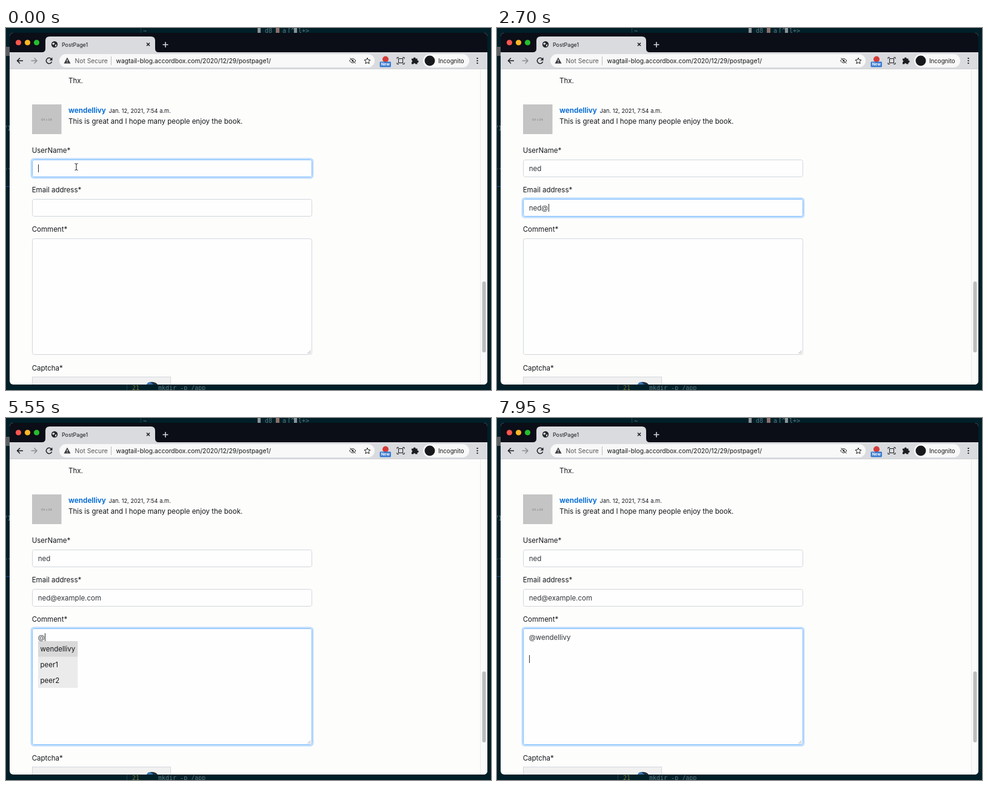
These frames come from a looping animation (800x597 px, 8000 ms). An HTML page:

```html
<!DOCTYPE html>
<html lang="en">
<head>
<meta charset="utf-8">
<title>Comment form</title>
<style>
  html, body { margin: 0; width: 100%; height: 100%; overflow: hidden; background: #001f28; }
  svg { display: block; width: 800px; height: 597px; }
  text { font: 11.5px Inter, "Open Sans", sans-serif; fill: #14171a; white-space: pre; }
  .typed { fill: #30353a; }
  .bold { font-weight: 700; }
  .mono { font: 10px "DejaVu Sans Mono", monospace; fill: #5b7a80; }
  .url { font-size: 10.28px; }
  .field { fill: #fefefe; stroke: #d2d7dc; }
  .focus { stroke: #80bdff; }
  .ring { fill: none; stroke: #007bff; stroke-opacity: .25; stroke-width: 2.4; }
  .icon { fill: none; stroke: #1c1d20; stroke-width: 1.5; }
  .thin { stroke-width: 1; }
</style>
</head>
<body>
<svg viewBox="0 0 800 597">
  <defs>
    <clipPath id="windowClip"><rect x="6" y="8" width="788" height="580" rx="6"/></clipPath>
  </defs>

  <!-- desktop behind the window -->
  <rect width="800" height="597" fill="#001f28"/>
  <path d="M222.500 0V8M199.500 588V597" stroke="#1b434c"/>
  <path d="M0 261.500H6" stroke="#1d4d8c"/>
  <rect y="31" width="6" height="15" fill="#5a6064"/>
  <rect x="415" width="5" height="8" fill="#8a9296"/>
  <rect x="445" width="6" height="8" fill="#8c6f68"/>
  <rect x="475" width="5" height="8" fill="#8a9296"/>
  <g>
    <text class="mono" x="226" y="9">~</text>
    <text class="mono" x="427" y="8">d8</text>
    <text class="mono" x="456" y="8">a</text>
    <text class="mono" x="464" y="8">[^</text>
    <text class="mono" x="482" y="8">l+&gt;</text>
    <text class="mono" x="-4" y="169">71</text>
    <text class="mono" x="-4" y="233">1.</text>
    <text class="mono" x="208" y="597" style="fill:#737a30">21</text>
    <text class="mono" x="251" y="597">mkdir -p /app</text>
  </g>

  <g clip-path="url(#windowClip)">
    <rect x="6" y="8" width="788" height="580" fill="#fdfdfc"/>
    <rect x="6" y="8" width="788" height="32" fill="#0b0d17"/>
    <path d="M59 40q6 0 6-6V21q0-7 7-7H239q7 0 7 7V34q0 6 6 6z" fill="#d9dbdf"/>
    <rect x="6" y="40" width="788" height="28" fill="#d9dbdf"/>
    <path d="M6 67.500H794" stroke="#cdcfd3"/>
    <circle cx="20.500" cy="24" r="4.600" fill="#fb564c"/>
    <circle cx="35.500" cy="24" r="4.600" fill="#fdb724"/>
    <circle cx="50.500" cy="24" r="4.600" fill="#25bd2d"/>

    <!-- tab -->
    <circle cx="80" cy="27" r="5.200" fill="#25262a"/>
    <path d="M76 25.500l3-1.500 1.500 1.500-1.500 2h-2zM81 27.500l2.500-.5-.5 2.500-2 1.500z" fill="#d9dbdf"/>
    <text x="92" y="30.500" style="font-size:8.9px">PostPage1</text>
    <path class="icon" d="M232 24.500l5 5m0-5l-5 5"/>
    <path class="icon" d="M258.500 27.500h9m-4.500-4.500v9" style="stroke:#d9dbdf"/>

    <!-- toolbar -->
    <path class="icon" d="M28 54H18.500m4.500-4.500L18.500 54l4.500 4.500"/>
    <path class="icon" d="M41.500 54H51m-4.500-4.500L51 54l-4.500 4.500" style="stroke:#8c8e92"/>
    <path class="icon" d="M74.600 51A4.700 4.700 0 1 0 75.500 55.500"/>
    <path d="M76.500 48.500v5h-5z" fill="#1c1d20"/>
    <rect x="88" y="43" width="520" height="22" rx="11" fill="#f8f8f8"/>
    <path d="M101 48.500l5.500 10h-11z" fill="#3a3b3f"/>
    <path d="M101 52v3m0 1v1.300" stroke="#f8f8f8" stroke-width="1.200"/>
    <text class="url" x="113.500" y="57.500" style="fill:#55575c">Not Secure</text>
    <path d="M173.500 47V61" stroke="#b9bbbf"/>
    <text class="url" x="181.500" y="57.500">wagtail-blog.accordbox.com/2020/12/29/postpage1/</text>
    <path class="icon thin" d="M566.500 54q5.200-7 10.500 0q-5.300 7-10.500 0zM567.500 49.500l9 9"/>
    <circle cx="571.800" cy="54" r="1.500" fill="#1c1d20"/>
    <path class="icon thin" d="M596 49.200l1.400 3.300 3.600.3-2.700 2.400.8 3.500-3.100-1.900-3.100 1.900.8-3.500-2.700-2.400 3.600-.3z"/>
    <circle cx="626" cy="51.500" r="5" fill="#d43c38"/>
    <rect x="616.500" y="55.500" width="18.500" height="9" rx="1.500" fill="#397bd0"/>
    <text class="bold" x="625.800" y="62.400" text-anchor="middle" style="font-size:6.5px;fill:#fff">New</text>
    <rect class="icon thin" x="647.500" y="50.500" width="7" height="7"/>
    <path class="icon thin" d="M645 51v-2.500h3m6 0h3V51m0 6v2.500h-3m-6 0h-3V57"/>
    <path d="M669 50.500h3.200a1.700 1.700 0 1 1 3.300 0h3v3.200a1.700 1.700 0 1 1 0 3.300v2.500h-3.200a1.600 1.600 0 0 0-3.200 0H669v-3a1.700 1.700 0 0 0 0-3.300z" fill="#1c1d20"/>
    <rect x="688" y="43" width="76" height="22" rx="11" fill="#f8f8f8"/>
    <circle cx="699" cy="54" r="8.500" fill="#18191c"/>
    <text x="713" y="57.500" style="font-size:9.7px">Incognito</text>
    <path d="M777.500 49v2m0 2v2m0 2v2" stroke="#1c1d20" stroke-width="2"/>

    <!-- page -->
    <rect x="782" y="68" width="12" height="520" fill="#fafafa"/>
    <path d="M782.500 68V588" stroke="#ebebeb"/>
    <rect x="785.500" y="418" width="6" height="117" rx="3" fill="#bdbdbd"/>
    <text x="103" y="91">Thx.</text>
    <rect x="43" y="126" width="48.500" height="49" fill="#c4c4c4"/>
    <text x="67" y="153" text-anchor="middle" style="font-size:5px;fill:#858585">64 x 64</text>
    <text class="bold" x="103" y="140" style="font-size:11.7px;fill:#0f72d6">wendellivy</text>
    <text x="169.500" y="140" style="font-size:9.25px">Jan. 12, 2021, 7:54 a.m.</text>
    <text x="103" y="158">This is great and I hope many people enjoy the book.</text>
    <text x="42.700" y="206">UserName*</text>
    <text x="42.700" y="271">Email address*</text>
    <text x="42.700" y="336">Comment*</text>
    <text x="42.700" y="564.500">Captcha*</text>
    <rect x="43.500" y="575.500" width="228" height="40" fill="#f1f1f1" stroke="#d2d7dc"/>
    <path d="M232 588q2-5 8-4l4 4z" fill="#3c78b8"/>
    <path d="M238 584q8-1 12 4h-7z" fill="#22303c"/>

    <rect class="field" x="43.500" y="217.500" width="461" height="28" rx="3"/>
    <rect class="field" x="43.500" y="282.500" width="461" height="28" rx="3"/>
    <rect class="field" x="43.500" y="347.500" width="461" height="191" rx="3"/>
    <rect id="ring" class="ring" x="41.800" width="464.400" rx="4"/>
    <path d="M497.500 537l5-5m-2 5l2-2" stroke="#8b8b8b" stroke-width=".8"/>

    <text class="typed" x="52.700" y="235.500"></text>
    <text class="typed" x="52.700" y="300.500"></text>
    <text class="typed" x="52.700" y="365.500"></text>

    <g id="menu">
      <rect id="menuBack" x="53" y="368" fill="#ebebeb"/>
      <rect id="menuTop" x="53" y="368" height="25.700" fill="#d9d9d9"/>
      <text x="56.500" y="385"><tspan id="match" class="bold"></tspan><tspan id="rest"></tspan></text>
      <g id="others">
        <text x="56.500" y="411">peer1</text>
        <text x="56.500" y="436.700">peer2</text>
      </g>
    </g>
    <rect id="caret" width="1" height="13" fill="#2b2f33"/>
    <path id="pointer" class="icon thin" d="M113.500 223.500q2.500 0 2.500 1.500q0-1.500 2.500-1.500M116 225v8M113.500 234.500q2.500 0 2.500-1.500q0 1.500 2.500 1.500"/>
  </g>
</svg>
<script>
const LOOP = 8000;
const MEMBER = 'wendellivy';
const byId = id => document.getElementById(id);
const attrs = (node, values) => {
  for (const key in values) node.setAttribute(key, values[key]);
};
const show = (node, on) => { node.style.display = on ? '' : 'none'; };

const fields = [...document.querySelectorAll('.field')];
const texts = [...document.querySelectorAll('.typed')];

// Keystroke times per field, after the time it gains focus.
const typing = [
  { focus: 0, text: 'ned', keys: [600, 750, 900] },
  { focus: 1450, text: 'ned@example.com',
    keys: [2150, 2300, 2400, 2600, 3000, 3250, 3450, 3650, 3850, 4050, 4250, 4400, 4550, 4650, 4750] },
  { focus: 5000, text: '@wendell', keys: [5400, 5900, 6050, 6200, 6350, 6450, 6600, 6700] }
];
const PICK = 7100;
const RETURNS = [7400, 7700];

function setText(node, value) {
  if (node.textContent !== value) node.textContent = value;
}

function drawMenu(t, typed) {
  const open = typed.length > 0 && t < PICK;
  show(byId('menu'), open);
  if (!open) return;
  const query = typed.slice(1);
  setText(byId('match'), query);
  setText(byId('rest'), MEMBER.slice(query.length));
  const width = byId('match').parentNode.getComputedTextLength() + 7.5;
  attrs(byId('menuBack'), { width, height: query ? 25.7 : 77 });
  attrs(byId('menuTop'), { width });
  show(byId('others'), !query);
}

function draw(t) {
  const active = typing.filter(f => t >= f.focus).length - 1;
  const pressed = typing.map(f => f.keys.filter(k => t >= k));
  const values = typing.map((f, i) => f.text.slice(0, pressed[i].length));
  drawMenu(t, values[2]);
  if (t >= PICK) values[2] = '@' + MEMBER;
  values.forEach((value, i) => setText(texts[i], value));
  fields.forEach((field, i) => field.classList.toggle('focus', i === active));
  attrs(byId('ring'), {
    y: [215.8, 280.8, 345.8][active],
    height: active === 2 ? 194.4 : 31.4
  });

  const lines = RETURNS.filter(k => t >= k).length;
  const textWidth = lines || !values[active] ? 0 : texts[active].getComputedTextLength();
  attrs(byId('caret'), {
    x: Math.round(53 + textWidth),
    y: [225, 290, 355][active] + lines * 18
  });
  const marks = [typing[active].focus, ...pressed[active]];
  if (active === 2) marks.push(...[PICK, ...RETURNS].filter(k => t >= k));
  const idle = t - marks[marks.length - 1];
  show(byId('caret'), idle % 1000 < 500);
  show(byId('pointer'), t < typing[0].keys[0]);
}

function tick() {
  draw(performance.now() % LOOP);
  requestAnimationFrame(tick);
}
tick();
</script>
</body>
</html>
```
